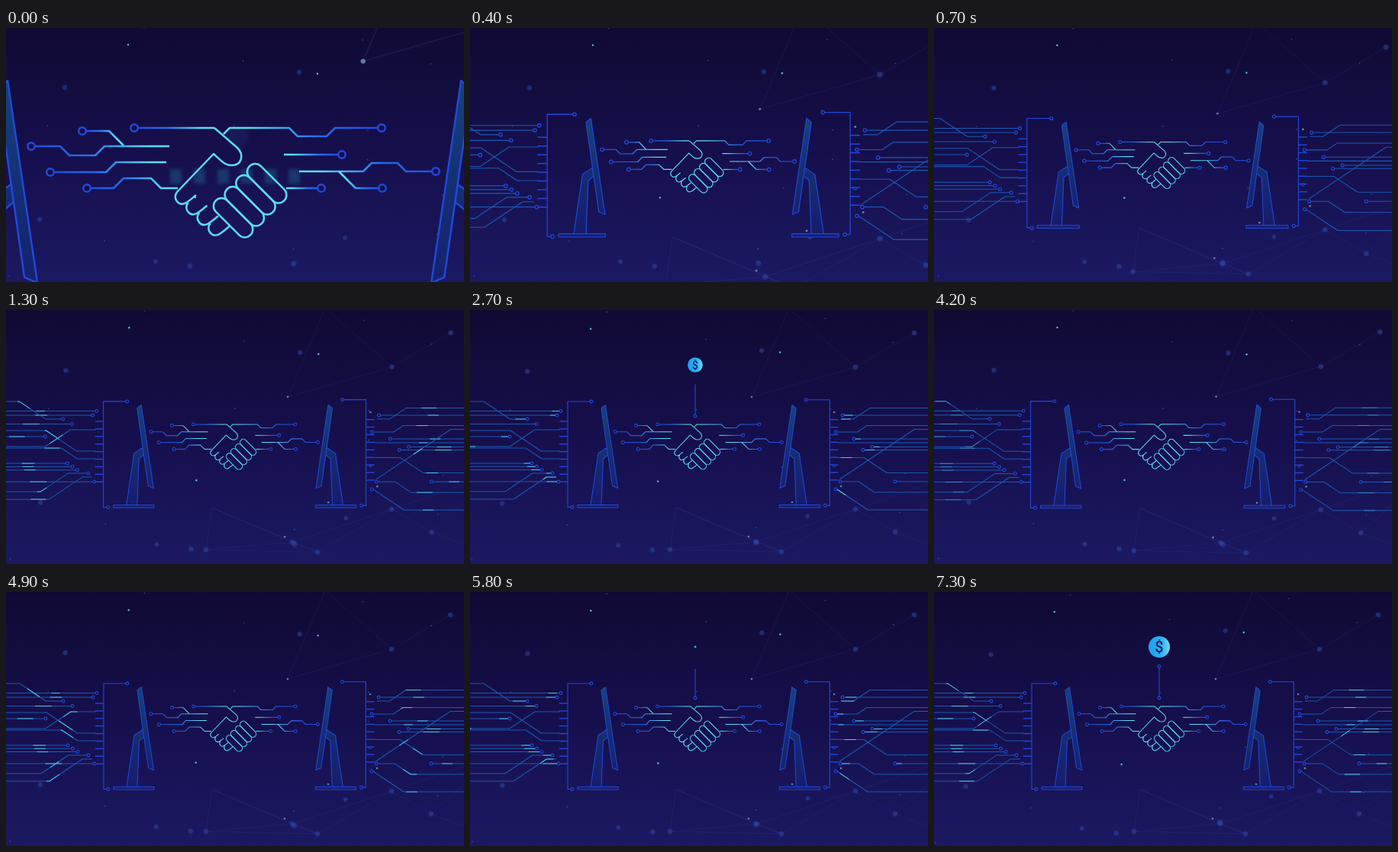
An HTML page with a canvas that plays this animation: 600x333 px, repeating every 7.4 s.

```html
<!DOCTYPE html>
<html lang="en">
<head>
<meta charset="utf-8">
<title>Digital handshake</title>
<style>
html, body { margin: 0; width: 100%; height: 100%; overflow: hidden; background: #150f4a; }
canvas { display: block; width: 600px; height: 333px; }
</style>
</head>
<body>
<canvas id="stage" width="600" height="333"></canvas>
<script>
const ctx = document.getElementById('stage').getContext('2d');
const W = 600, H = 333, LOOP = 7400, STEP = 100;
const CX = 300, CY = 163.2, ZOOM = 2.431;
const BLUE = '#2149da', CYAN = '#5adcf2', WIRE = '#1a59b2', NAVY = '#150f4a';

const clamp = v => Math.max(0, Math.min(1, v));
const progress = (t, from, duration) => clamp((t - from) / duration);
const easeInOut = p => p < .5 ? 2 * p * p : 1 - 2 * (1 - p) * (1 - p);
const noise = n => { const v = Math.sin(n * 127.1 + 3.7) * 43758.5; return v - Math.floor(v); };
const repeat = (count, make) => Array.from({ length: count }, (_, i) => make(i));

// Wires enter from a stage edge and run towards a computer; slanted parts share one slope.
const wires = [];
function wire(side, y, end, { bend = end, endY = y, open = false } = {}) {
  const edge = side > 0 ? -10 : W + 10;
  const rise = endY - y, slant = Math.abs(rise) / .67;
  const pts = [[edge, y], [bend, y], [bend + side * slant, endY], [end, endY]];
  const length = Math.abs(end - edge) + Math.hypot(slant, rise) - slant;
  const n = wires.length;
  wires.push({
    pts, open, length,
    dash: 11 + noise(n + 50) * 12,
    shift: (noise(n) - .5) * (open ? .3 : .08)
  });
}
const bundle = (side, y, end, count, dy, dx) =>
  repeat(count, i => wire(side, y + dy * i, end + dx * i));

bundle(1, 132.5, 119, 2, 5.5, -5);
bundle(1, 149.5, 87, 2, 16.5, -35);
bundle(1, 201, 81, 3, 4.3, 6.5);
wire(1, 225, 116);
wire(1, 120, 75, { bend: 18, endY: 143 });
wire(1, 238, 108, { bend: 46, endY: 214 });
wire(1, 248, 113, { bend: 57, endY: 219, open: true });
wire(1, 158, 118, { bend: 53, endY: 185, open: true });
wire(1, 179, 118, { bend: 52, endY: 157, open: true });
wire(1, 181, 118, { bend: 73, endY: 195, open: true });

bundle(-1, 179.5, 527, 2, 4, -12);
wire(-1, 138, 488);
wire(-1, 169, 503);
wire(-1, 225, 557);
wire(-1, 151.5, 479, { bend: 520, endY: 160 });
wire(-1, 239, 485, { bend: 530, endY: 225 });
wire(-1, 262, 479, { bend: 521, endY: 235 });
wire(-1, 174, 482, { open: true });
wire(-1, 128.5, 486, { bend: 524, endY: 143, open: true });
wire(-1, 213.5, 482, { bend: 546, endY: 193.5, open: true });
wire(-1, 156.5, 484, { bend: 582, endY: 222, open: true });

// Traces leave a ring sideways, alternating straight runs and 45 degree rises.
function circuit(x, y, dir, ...moves) {
  const pts = [[x, y]];
  moves.forEach((m, i) => {
    x += dir * Math.abs(m);
    if (i % 2) y += m;
    pts.push([x, y]);
  });
  return pts;
}
const circuits = [
  circuit(100, 135, 1, 35, 19),
  circuit(33, 155, 1, 38, 12, 34, -12, 85),
  circuit(168, 131, 1, 105),
  circuit(58, 189, 1, 73, -13, 66),
  circuit(106, 210, 1, 35, -13, 36, 13, 22),
  circuit(492, 131, -1, 61, 11, 38, -11, 78, 8),
  circuit(440, 166, -1, 76),
  circuit(563, 188, -1, 39, -11, 34, 11, 84),
  circuit(493, 210, -1, 35, -22),
  circuit(413, 210, -1, 46)
];

const palm = 'M273 131L303 157C313 167 308 180 296 180C287 180 284 176 272 165L224 215';
const fingertips = repeat(4, i =>
  `M${224 + 14.5 * i} ${215 + 13.7 * i}c-6 9 2 18 10 15c5 -2 10 -7 15 -11`);
const hand = new Path2D(palm + fingertips.join(''));

// Network nodes; neighbours closer than the reach are joined.
const REACH = 150;
const nodes = [[369, 114], [505, 75], [582, 30], [505, 261], [557, 291], [408, 317], [375, 304], [262, 314]];
const hidden = [[418, -2], [640, 215], [660, 330], [270, 259]];
const allNodes = [...nodes, ...hidden];
const links = allNodes.flatMap((a, i) => allNodes.slice(i + 1)
  .filter(b => Math.hypot(a[0] - b[0], a[1] - b[1]) < REACH).map(b => [a, b]));
const paleDots = [[369, 114], [477, 134], [486, 231], [422, 252], [365, 297]];

const softDots = [[77, 78], [384, 58], [44, 251], [196, 306], [241, 312], [377, 309], [444, 275]];
const brightDots = [[160, 22], [408, 60], [248, 222]];
const dust = repeat(14, i => [noise(i + 11) * W, noise(i + 37) * H]);

function trace(pts) {
  ctx.beginPath();
  pts.forEach(([x, y]) => ctx.lineTo(x, y));
}
function line(pts, color, width) {
  trace(pts);
  ctx.strokeStyle = color;
  ctx.lineWidth = width;
  ctx.stroke();
}
function disc(x, y, r, color) {
  ctx.beginPath();
  ctx.arc(x, y, r, 0, 7);
  ctx.fillStyle = color;
  ctx.fill();
}
function ring(x, y, r = 1.9, width = 1.1) {
  disc(x, y, r, NAVY);
  ctx.strokeStyle = BLUE;
  ctx.lineWidth = width;
  ctx.stroke();
}
function glow(x, y, r, color) {
  const g = ctx.createRadialGradient(x, y, 0, x, y, r);
  g.addColorStop(0, color);
  g.addColorStop(.55, color);
  g.addColorStop(1, 'rgba(40,70,170,0)');
  disc(x, y, r, g);
}
function gradient(x0, y0, x1, y1, stops) {
  const g = ctx.createLinearGradient(x0, y0, x1, y1);
  stops.forEach(([at, color]) => g.addColorStop(at, color));
  return g;
}
// Draws inside a saved state scaled about a point.
function scaled(x, y, s, draw) {
  ctx.save();
  ctx.translate(x, y);
  ctx.scale(s, s);
  ctx.translate(-x, -y);
  draw();
  ctx.restore();
}

function drawBackdrop(u) {
  ctx.fillStyle = gradient(0, 0, 0, H, [[0, '#100a33'], [.5, '#160f4d'], [1, '#1b1962']]);
  ctx.fillRect(0, 0, W, H);
  const sway = 2.2 * Math.cos((u - 1000) / 2500 * Math.PI) - .7;
  const drift = x => (x > 300 ? -7 : 4) * u / 4100;
  for (const [x, y] of dust) disc(x + sway, y + drift(x), .8, 'rgba(85,125,180,.6)');
  for (const [x, y] of softDots)
    glow(x + sway, y + drift(x), 3.4 + 1.4 * noise(x), 'rgba(48,76,165,.5)');
  for (const [x, y] of brightDots) disc(x + sway, y + drift(x), 1.2, '#58c3e2');
}

function drawNetwork() {
  for (const link of links) line(link, 'rgba(75,85,185,.17)', .8);
  for (const [x, y] of nodes.slice(1)) glow(x, y, 4.2, 'rgba(48,72,165,.55)');
  for (const [x, y] of paleDots) disc(x, y, 1.3, 'rgba(120,155,185,.8)');
}

function drawWires(u) {
  for (const { pts, length, dash, shift } of wires) {
    line(pts, WIRE, 1);
    const phase = ((u + 50) / 2800 + shift + 1) % 1;
    ctx.save();
    ctx.globalAlpha = .85 * progress(u, 850, 300);
    ctx.setLineDash([dash, 2000]);
    ctx.lineDashOffset = dash - phase * (length + dash * .5);
    line(pts, CYAN, 1);
    ctx.restore();
  }
  for (const { pts, open } of wires) if (!open) ring(...pts[3]);
}

function drawComputer() {
  const fill = gradient(0, 124, 0, 256, [[0, '#14427c'], [.5, '#152c74'], [1, '#161c6c']]);
  for (const shape of [
    [[168, 188], [180, 180], [183, 188], [174.5, 195], [172, 256], [158, 256]],
    [[172, 129], [177.5, 124.5], [193.5, 233.5], [186.5, 230.5]],
    [[141, 255.5], [194, 255.5], [194, 259], [141, 259]]
  ]) {
    trace(shape);
    ctx.closePath();
    ctx.fillStyle = fill;
    ctx.fill();
    ctx.strokeStyle = BLUE;
    ctx.lineWidth = 1;
    ctx.stroke();
  }
}

function drawPorts() {
  line([[159, 120], [128, 120], [128, 258.5], [134, 258.5]], BLUE, 1.1);
  for (let i = 0; i < 9; i++) line([[117, 146 + 9.9 * i], [128, 146 + 9.9 * i]], BLUE, 1.3);
  ring(159, 120);
  ring(134, 258.5);
}

function drawComputers() {
  drawPorts();
  drawComputer();
  ctx.save();
  ctx.translate(599.3, 0);
  ctx.scale(-1, 1);
  drawComputer();
  ctx.translate(0, -2.3);
  drawPorts();
  ctx.restore();
  ring(477, 204, 1.5);
}

function drawHaze(u) {
  const haze = Math.exp(-u / 160);
  if (haze < .02) return;
  ctx.save();
  ctx.globalAlpha = haze * .3;
  ctx.filter = 'blur(2px)';
  ctx.fillStyle = '#238fb0';
  for (let i = 0; i < 6; i++) ctx.fillRect(215 + 31 * i, 185, 15, 19);
  ctx.restore();
  glow(303, 143, 18, `rgba(35,90,150,${.16 * haze})`);
}

// Hands and traces are laid out at close-up size.
function drawHands(u) {
  drawHaze(u);
  for (const pts of circuits) {
    const from = pts[0][0], to = pts[pts.length - 1][0];
    line(pts, gradient(from, 0, to, 0, [[0, BLUE], [.4, '#286be8'], [.85, CYAN]]), 2.5);
  }
  for (const [[x, y]] of circuits) ring(x, y, 4.8, 2.5);
  ctx.strokeStyle = CYAN;
  ctx.lineWidth = 2.5;
  ctx.stroke(hand);
  for (let i = 0; i < 4; i++) {
    ctx.save();
    ctx.translate(326.5 - 14.7 * i, 188.5 + 15 * i);
    ctx.rotate(Math.PI / 4);
    ctx.beginPath();
    ctx.roundRect(-10.5, -10.5, 64, 21, 10.5);
    ctx.stroke();
    ctx.restore();
  }
}

function drawCoin(u) {
  if (u < 2150) return;
  const top = 139 - 41.5 * easeInOut(progress(u, 2200, 500));
  line([[295, 139], [295, top]], BLUE, 1.1);
  ring(295, 139);
  if (u >= 2800) ring(295, top);
  const size = easeInOut(progress(u, 2540, 260));
  if (!size) return;
  scaled(295, 72, size, () => {
    disc(295, 72, 14, gradient(281, 0, 309, 0, [[0, '#18a2ee'], [.6, '#26b2f2'], [1, '#78d6f4']]));
    ctx.fillStyle = '#17206a';
    ctx.font = '500 20px Roboto, sans-serif';
    ctx.textAlign = 'center';
    ctx.fillText('$', 295, 79);
  });
}

function render(t) {
  // The second pass skips the close-up and joins as the zoom settles.
  const u = t < 4100 ? t : t - 3200;
  const zoom = 1 + (ZOOM - 1) * Math.exp(-5.1 * Math.pow(u / 1000, .91));
  ctx.lineJoin = 'round';
  drawBackdrop(u);
  scaled(CX, CY, zoom, () => {
    drawNetwork();
    drawWires(u);
    drawComputers();
    scaled(CX, CY, 1 / ZOOM, () => drawHands(u));
    drawCoin(u);
  });
}

const start = performance.now();
function tick() {
  const t = (performance.now() - start) % LOOP;
  render(Math.floor(t / STEP) * STEP);
  requestAnimationFrame(tick);
}
tick();
</script>
</body>
</html>
```
